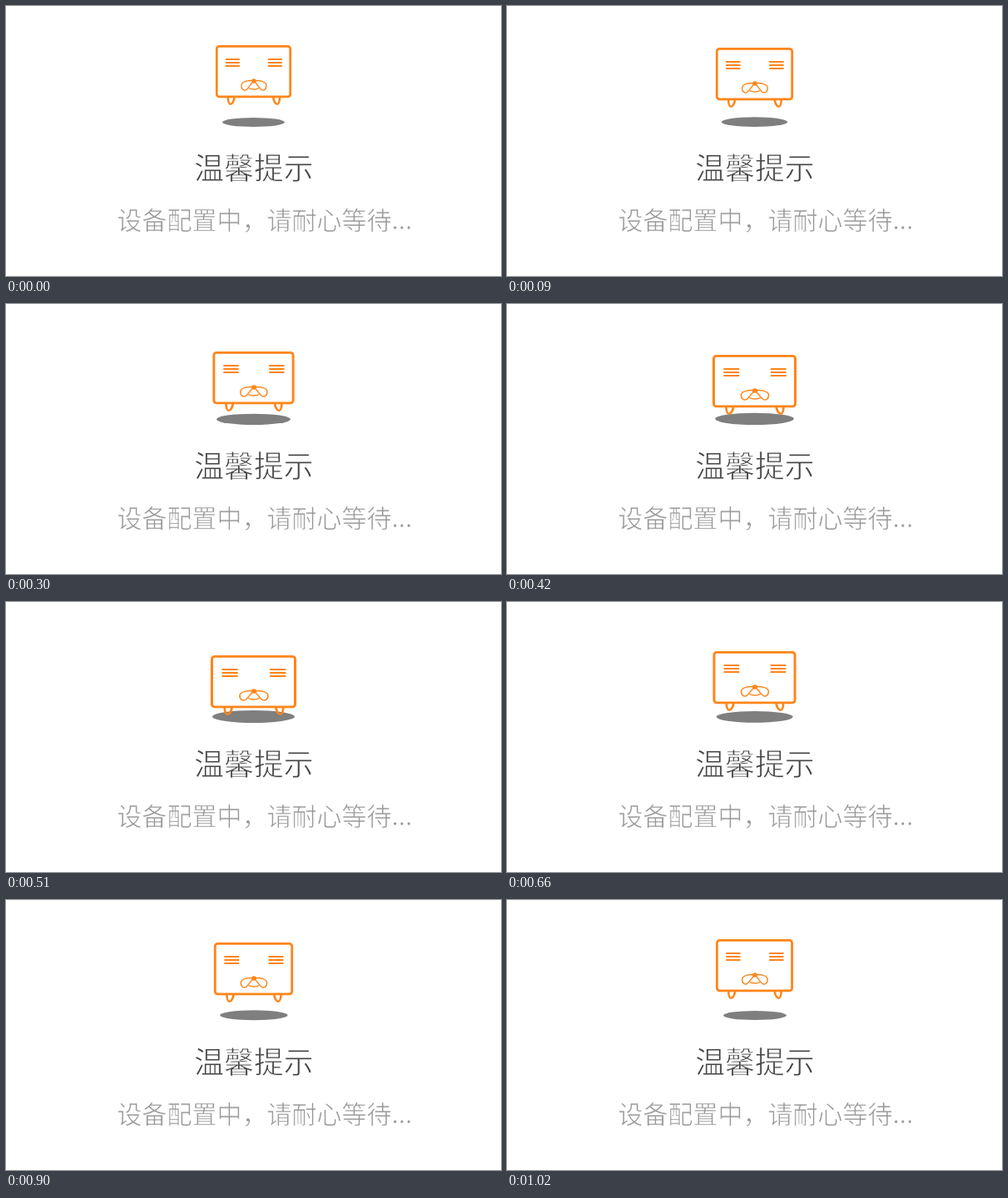
Write an HTML page that moves like this. It is 595 by 324 pixels and loops after 1120 ms.

```html
<!DOCTYPE html>
<html lang="zh-CN">
<head>
<meta charset="utf-8">
<style>
html, body { margin: 0; width: 100%; height: 100%; overflow: hidden; background: #fff; }
svg { display: block; }
/* the white outline thins the regular weight to a light one */
text { font-family: "Noto Sans CJK SC", "Noto Sans CJK", sans-serif; font-weight: 300; stroke: #fff; }
</style>
</head>
<body>
<svg width="595" height="324" viewBox="0 0 595 324">
  <defs>
    <!-- right half of the face and its leg, mirrored for the left -->
    <g id="half">
      <path d="M17 17h17m-17 4h17m-17 4h17" stroke-width="1.9"/>
      <path d="M0 43C6 41.5 15 43.5 15 48.5C15 53 11.5 55.5 8.5 53C6 50.8 4 46.5 0 43" stroke-width="1.4"/>
      <path d="M23.2 62C23.8 67 26 70.8 28.2 70.8C30.5 70.8 31 66 31.2 62" stroke-width="2.5"/>
    </g>
  </defs>
  <ellipse id="shadow" fill="#7f7f7f"/>
  <g id="body" fill="none" stroke="#ff8519">
    <rect x="-44.2" y="1.4" width="88.4" height="60.4" rx="3" stroke-width="2.7"/>
    <g transform="translate(.4 0)">
      <use href="#half"/>
      <use href="#half" transform="scale(-1 1)"/>
      <path d="M-6 51.7Q0 54.3 6 51.7" stroke-width="1.4"/>
      <circle cy="43" r="2.8" fill="#ff8519" stroke="none"/>
    </g>
  </g>
  <text x="226.3" y="207.5" font-size="35.8" fill="#444" stroke-width=".8">温馨提示</text>
  <text x="133.4" y="267.5" font-size="30" fill="#999" stroke-width=".7">设备配置中，请耐心等待...</text>
</svg>
<script>
const LOOP = 1120, STEP = 30, LOW = 17, END = 34;
const shadow = document.getElementById("shadow");
const body = document.getElementById("body");
const mix = (a, b, k) => a + (b - a) * k;

function draw(now) {
  const n = Math.min(END, Math.floor(now % LOOP / STEP));
  const falling = n <= LOW;
  const drop = falling ? n : END - n;
  const k = drop / LOW;
  const width = mix(falling ? 91 : 92.8, 103, k);
  body.setAttribute("transform", `translate(297.5 ${47 + drop}) scale(${width / 91} 1)`);
  const attrs = {
    cx: mix(falling ? 297.5 : 298, 297.5, k),
    cy: mix(falling ? 139.5 : 138.5, 137.5, k),
    rx: mix(falling ? 37.5 : 38, 49.5, k),
    ry: mix(5.5, 7.5, k)
  };
  for (const name in attrs) shadow.setAttribute(name, attrs[name]);
}

function tick(now) {
  draw(now);
  requestAnimationFrame(tick);
}
draw(0);
requestAnimationFrame(tick);
</script>
</body>
</html>
```
